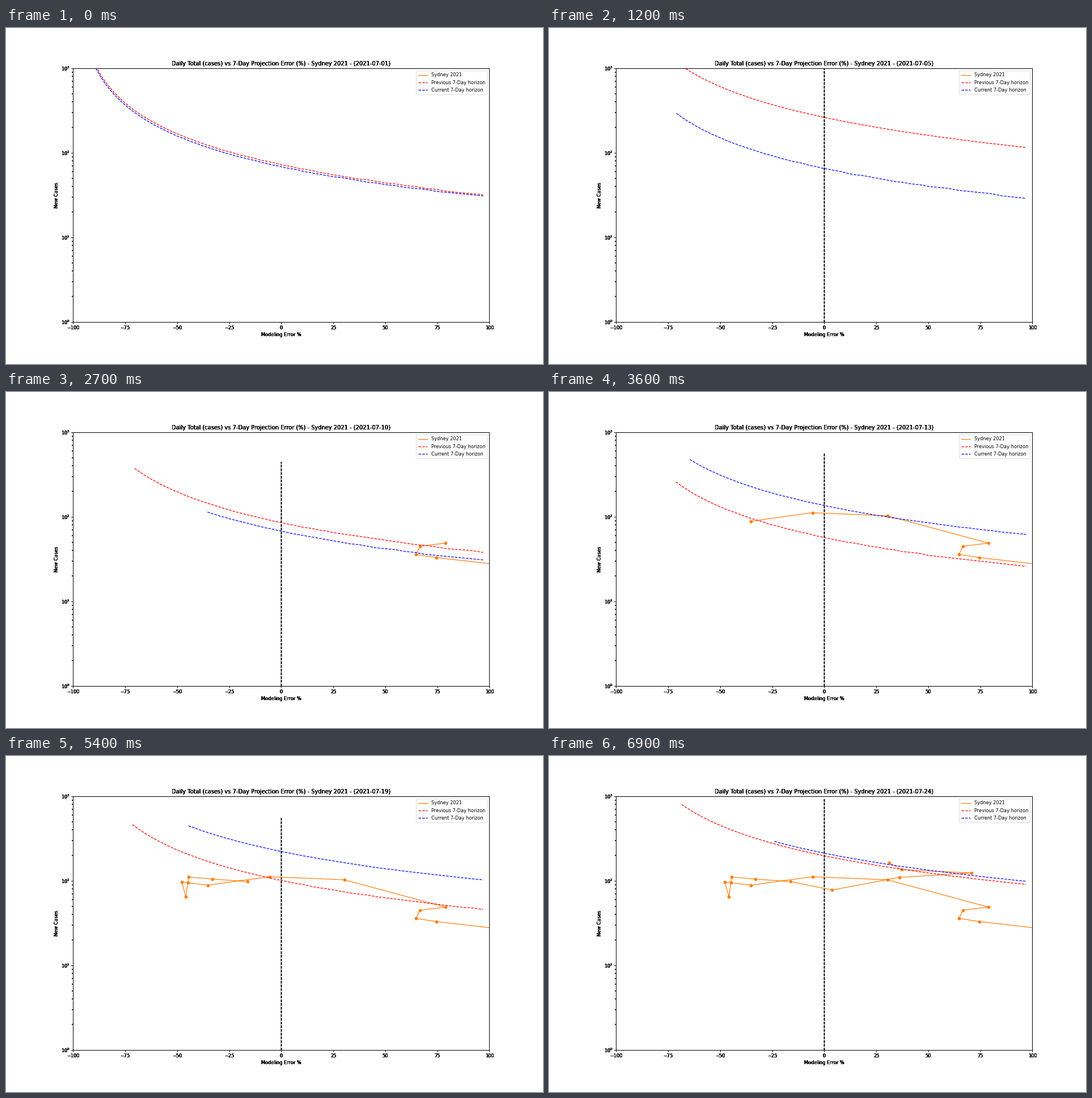
Animation of 947x592 px, one loop 7.2 s. Source, as a matplotlib script:

```python
import numpy as np
import matplotlib.pyplot as plt
from matplotlib.animation import FuncAnimation

DAYS = 24
HORIZON = 7
LAYERS = 5      # stacked axes give the heavy, overprinted lettering
STEP = 0.03     # spacing of curve points in log(1 + error)
RIGHT = 97      # error % at which every curve ends
ORANGE = "#ff7f0e"

# Turning points of the projections: day, cases at zero error, left end in %
KEYS = np.array([
    (-6, 72.6, -95), (-4, 178, -95), (-2, 263, -95), (0, 73.2, -95),
    (1, 68.7, -95), (3, 85.6, -70.5), (7, 50, -71.6), (8, 54.7, -62.4),
    (10, 67.7, -35.5), (12, 101.3, -71.5), (15, 246, -45.5),
    (17, 198.3, -68.5), (19, 222.7, -44.6), (24, 212.8, -24),
])

# Path of the daily results (error %, new cases), one point a day
TRACK_START = 6
TRACK = np.array([
    (125.5, 23.7), (74.6, 33), (64.7, 36), (66.7, 45), (78.9, 49),
    (30.3, 103), (-5.7, 112), (-35.2, 89), (-47.8, 97), (-45.8, 65),
    (-44.9, 96), (-44.4, 111), (-33, 105), (-16.2, 98), (3.8, 78),
    (36, 110), (70.7, 124), (37.2, 136), (31.2, 163),
])


def projection(day):
    """Power law of the error, rounded to whole cases."""
    key_days, bases, lefts = KEYS.T
    base = np.exp(np.interp(day, key_days, np.log(bases)))
    lo = np.interp(day, key_days, np.log1p(lefts / 100))
    hi = np.log1p(RIGHT / 100)
    log_u = np.linspace(lo, hi, round((hi - lo) / STEP) + 1)
    power = np.interp(log_u, [-1.2, hi], [1.21, 1.2 - 0.003 * day])
    cases = np.round(base * np.exp(-power * log_u))
    return 100 * np.expm1(log_u), cases


def make_layer(fig, index):
    ax = fig.add_axes([0.125, 0.125, 0.775, 0.755], label=f"layer{index}")
    ax.patch.set_visible(index == 0)
    ax.set_yscale("log")
    ax.set_xlim(-100, 100)
    ax.set_ylim(1, 1000)
    ax.set_xlabel("Modeling Error %")
    ax.set_ylabel("New Cases")
    zero, = ax.plot([], [], "k--")
    return ax, zero


fig = plt.figure(figsize=(16, 10), dpi=59.2)
layers = [make_layer(fig, i) for i in range(LAYERS)]
top = layers[-1][0]

track, = top.plot([], [], color=ORANGE, label="Sydney 2021")
dots, = top.plot([], [], "o", color=ORANGE)
previous, = top.plot([], [], "r--", label="Previous 7-Day horizon")
current, = top.plot([], [], "b--", label="Current 7-Day horizon")
top.legend(loc="upper right")


def update(frame):
    day = frame + 1
    old, new = projection(day - HORIZON), projection(day)
    previous.set_data(*old)
    current.set_data(*new)

    seen = TRACK[:max(0, day - TRACK_START + 1)]
    for line in (track, dots):
        line.set_data(*seen.T)

    peak = 1.2 * max(old[1].max(), new[1].max())
    title = ("Daily Total (cases) vs 7-Day Projection Error (%)"
             f" - Sydney 2021 - (2021-07-{day:02d})")
    for ax, zero in layers:
        ax.set_title(title)
        zero.set_data([0, 0], [1, peak])
        zero.set_visible(day > 1)
    return []


anim = FuncAnimation(fig, update, frames=DAYS, interval=300,
                     repeat=True, repeat_delay=0, blit=False)
plt.show()
```
